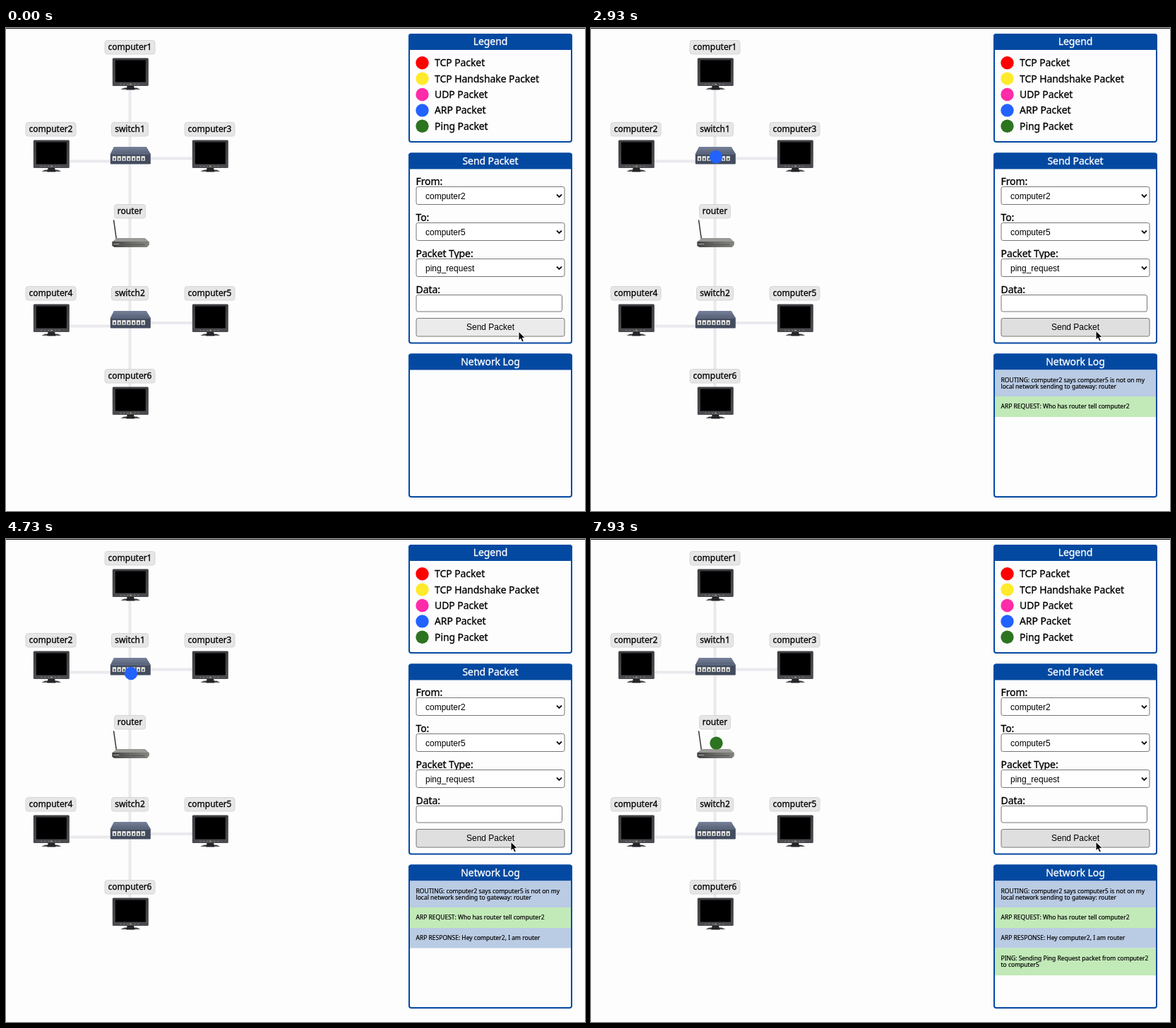
Recreate the animation shown at these times as an HTML page. Size 820 px wide and 683 px high, loop 8000 ms.

```html
<!DOCTYPE html>
<html lang="en">
<head>
<meta charset="utf-8">
<title>Network simulator</title>
<style>
html, body { margin: 0; width: 100%; height: 100%; overflow: hidden; background: #fdfdfd; }
svg { display: block; width: 820px; height: 683px; }
text { font: 14px "Noto Sans", "Open Sans", sans-serif; letter-spacing: -.08px; fill: #000; stroke: #000; stroke-width: .3px; }
.mid { text-anchor: middle; }
.title { fill: #fff; stroke: #fff; text-anchor: middle; }
.name { font-size: 12px; letter-spacing: 0; text-anchor: middle; }
.field { font: 12px "Liberation Sans", Arial, sans-serif; letter-spacing: 0; stroke: none; }
.log { font-size: 8.5px; letter-spacing: 0; stroke-width: .18px; }
</style>
</head>
<body>
<svg id="stage" viewBox="0 0 820 683">
  <defs>
    <linearGradient id="bezel" x2="0" y2="1">
      <stop offset="0" stop-color="#3d3d42"/><stop offset="1" stop-color="#4c4c51"/>
    </linearGradient>
    <linearGradient id="lid" x2="0" y2="1">
      <stop offset="0" stop-color="#77829a"/><stop offset="1" stop-color="#566178"/>
    </linearGradient>
    <linearGradient id="shell" x2="1" y2="0">
      <stop offset="0" stop-color="#424242"/><stop offset=".5" stop-color="#6a6b67"/><stop offset="1" stop-color="#82837e"/>
    </linearGradient>
    <g id="computer">
      <path d="M-5 38h10v5h-10z" fill="#222226"/>
      <path d="M-9 42h18l5 2.5h-28z" fill="#4b4b50"/>
      <path d="M-6 42h12v3h-12z" fill="#222226"/>
      <rect x="-25.5" width="51" height="39.5" rx="1.5" fill="url(#bezel)"/>
      <rect x="-21.5" y="3" width="43" height="31" fill="#000"/>
      <path d="M-15 37h29" stroke="#85857c" stroke-dasharray="2 3"/>
      <circle cy="37" r="1.1" fill="#b3a574"/>
    </g>
    <g id="switch">
      <path d="M-23.5 0h46l6 10h-57z" fill="url(#lid)"/>
      <rect x="-28.5" y="9.5" width="57" height="15" rx="1" fill="#434c5e"/>
      <path d="M-28 10h56" stroke="#717c93"/>
      <path d="M-25.5 16.5h47" stroke="#edece6" stroke-width="6.5" stroke-dasharray="5.2 1.6"/>
      <path d="M-23.8 17.3h45" stroke="#3b404b" stroke-width="3" stroke-dasharray="2 4.8"/>
    </g>
    <g id="router">
      <path d="M-23.7 0l3.7 26" stroke="#333" stroke-width="1.5" stroke-linecap="round"/>
      <path d="M-19.5 25h40l6 5.5h-52.5z" fill="#999a96"/>
      <path d="M-26 30h52.5v4.5l-3 3.5h-46.5l-3-2z" fill="url(#shell)"/>
      <path d="M-24 33.5h8" stroke="#aaaaa5"/>
      <path d="M-10 34.5h30" stroke="#555651"/>
    </g>
  </defs>
</svg>
<script>
const NS = "http://www.w3.org/2000/svg";
const stage = document.getElementById("stage");
const LOOP = 8000, LEG = 1000;
const NAVY = "#0449a1", BLUE = "#2262ff", GREEN = "#2c7420";

function add(tag, attrs, text) {
  const el = document.createElementNS(NS, tag);
  for (const key in attrs) el.setAttribute(key, attrs[key]);
  if (text) el.textContent = text;
  return stage.appendChild(el);
}
const rect = (x, y, width, height, fill, more) => add("rect", { x, y, width, height, fill, ...more });
const label = (x, y, text, cls = "") => add("text", { x, y, class: cls }, text);
const show = (el, on) => el.setAttribute("visibility", on ? "visible" : "hidden");

rect(0, 0, 820, 683, "#fdfdfd");
rect(0, 0, 820, 1, "#111");

// Links lie below the devices
add("path", {
  d: "M175.5 67V530M64 188.5H176M176 184.5H289M64 421.5H176M176 417H289",
  stroke: "#e9e9ee", "stroke-width": 4, fill: "none"
});

const shapes = {
  computer: { wide: 71, drop: 25.5 },
  switch: { wide: 52, drop: 35 },
  router: { wide: 44, drop: 23 }
};
function device(kind, name, x, row) {
  const { wide, drop } = shapes[kind];
  const y = Math.round(17 + row * 116.15);
  rect(x - wide / 2, y + .5, wide, 19.5, "#e6e6e6", { rx: 3.5, stroke: "#d6d6d6" });
  label(x, y + 14, name, "name");
  add("use", { href: "#" + kind, x: x + .8, y: y + drop });
}
device("computer", "computer1", 175.5, 0);
device("computer", "computer2", 63.5, 1);
device("switch", "switch1", 175.5, 1);
device("computer", "computer3", 288.5, 1);
device("router", "router", 175.5, 2);
device("computer", "computer4", 63.5, 3);
device("switch", "switch2", 175.5, 3);
device("computer", "computer5", 288.5, 3);
device("computer", "computer6", 175.5, 4);

function panel(y, height, title) {
  rect(571, y + 1, 230, height - 2, "#fdfdfd", { rx: 3, stroke: NAVY, "stroke-width": 2 });
  add("path", { d: `M570 ${y + 23}v-19q0-4 4-4h224q4 0 4 4v19z`, fill: NAVY });
  label(686, y + 16, title, "title");
}
panel(8, 154, "Legend");
panel(176.5, 270, "Send Packet");
panel(460.5, 203.5, "Network Log");

[["#ff0000", "TCP"], ["#ffea2b", "TCP Handshake"], ["#ff2ba8", "UDP"], [BLUE, "ARP"], [GREEN, "Ping"]]
  .forEach(([fill, kind], i) => {
    const cy = 49.2 + i * 22.4;
    add("circle", { cx: 589.5, cy, r: 9.2, fill });
    label(607, cy + 5, kind + " Packet");
  });

const edge = { stroke: "#767676", rx: 2.5 };
[["From:", "computer2"], ["To:", "computer5"], ["Packet Type:", "ping_request"]].forEach(([text, value], i) => {
  const y = 224.5 + i * 51;
  label(580.5, y - 2.5, text);
  rect(581, y, 210, 25, "#fff", edge);
  label(594, y + 17, value, "field");
  add("path", { d: `M780 ${y + 11}l3.5 3.5 3.5-3.5`, fill: "none", stroke: "#111", "stroke-width": 1.8 });
});
const ring = rect(581, 327, 210, 24.5, "none", { rx: 2.5, stroke: "#1059c8", "stroke-width": 2 });
label(580.5, 374.5, "Data:");
rect(581, 377.5, 206.5, 23.5, "#fff", edge);
const button = rect(581, 410.5, 210, 25.5, "#ebebeb", edge);
label(686, 427.3, "Send Packet", "field mid");

const REQUEST = 1955, FLOOD = 2970, REPLY = 3990, BACK = 5010, PING = 6232, ONWARD = 7215;

const entries = [
  [REQUEST, 483.5, 37.5, ["ROUTING: computer2 says computer5 is not on my", "local network sending to gateway: router"]],
  [REQUEST, 521, 29, ["ARP REQUEST: Who has router tell computer2"]],
  [REPLY, 550, 28.5, ["ARP RESPONSE: Hey computer2, I am router"]],
  [PING, 578.5, 38.5, ["PING: Sending Ping Request packet from computer2", "to computer5"]]
].map(([start, y, height, lines], i) => ({
  start,
  parts: [
    rect(572, y, 228, height, i % 2 ? "#c2e9b8" : "#bacbe4"),
    ...lines.map((line, n) => label(580.5, y + 17.2 + n * 9.5, line, "log"))
  ]
}));

const spot = {
  pc1: [177.5, 67], pc2: [66, 182.3], pc3: [289, 182.3], router: [177.5, 298], hub: [177, 182.3]
};
const packets = [
  [REQUEST, "pc2", "hub", BLUE],
  ...["pc1", "pc2", "pc3", "router"].map(to => [FLOOD, "hub", to, BLUE]),
  [REPLY, "router", "hub", BLUE],
  [BACK, "hub", "pc2", BLUE],
  [PING, "pc2", "hub", GREEN],
  [ONWARD, "hub", "router", GREEN]
].map(([start, from, to, fill]) => ({
  start, from: spot[from], to: spot[to], dot: add("circle", { r: 9.2, fill })
}));

const cursor = add("path", {
  d: "M0 0v12.5l2.9-2.6 2 4.7 2.4-1-2-4.6h4z",
  fill: "#000", stroke: "#fff", "stroke-width": 1, "stroke-linejoin": "round"
});

const easeOut = p => 1 - (1 - p) ** 2;
const clamp = p => Math.min(1, Math.max(0, p));

function draw(t) {
  show(ring, t >= 670 && t < REQUEST);
  button.setAttribute("fill", t > 1060 ? "#dfdfdf" : "#ebebeb");
  const slide = easeOut(clamp((t - 1000) / 300));
  cursor.setAttribute("transform", `translate(${726 - 11 * slide} ${429.3 - slide})`);
  for (const { start, parts } of entries) parts.forEach(el => show(el, t >= start));
  for (const { start, from, to, dot } of packets) {
    const p = (t - start) / LEG;
    show(dot, p >= 0 && p <= 1.02);
    const k = easeOut(clamp(p));
    dot.setAttribute("cx", from[0] + (to[0] - from[0]) * k);
    dot.setAttribute("cy", from[1] + (to[1] - from[1]) * k);
  }
}

const origin = performance.now();
function tick() {
  draw((performance.now() - origin) % LOOP);
  requestAnimationFrame(tick);
}
draw(0);
requestAnimationFrame(tick);
</script>
</body>
</html>
```
